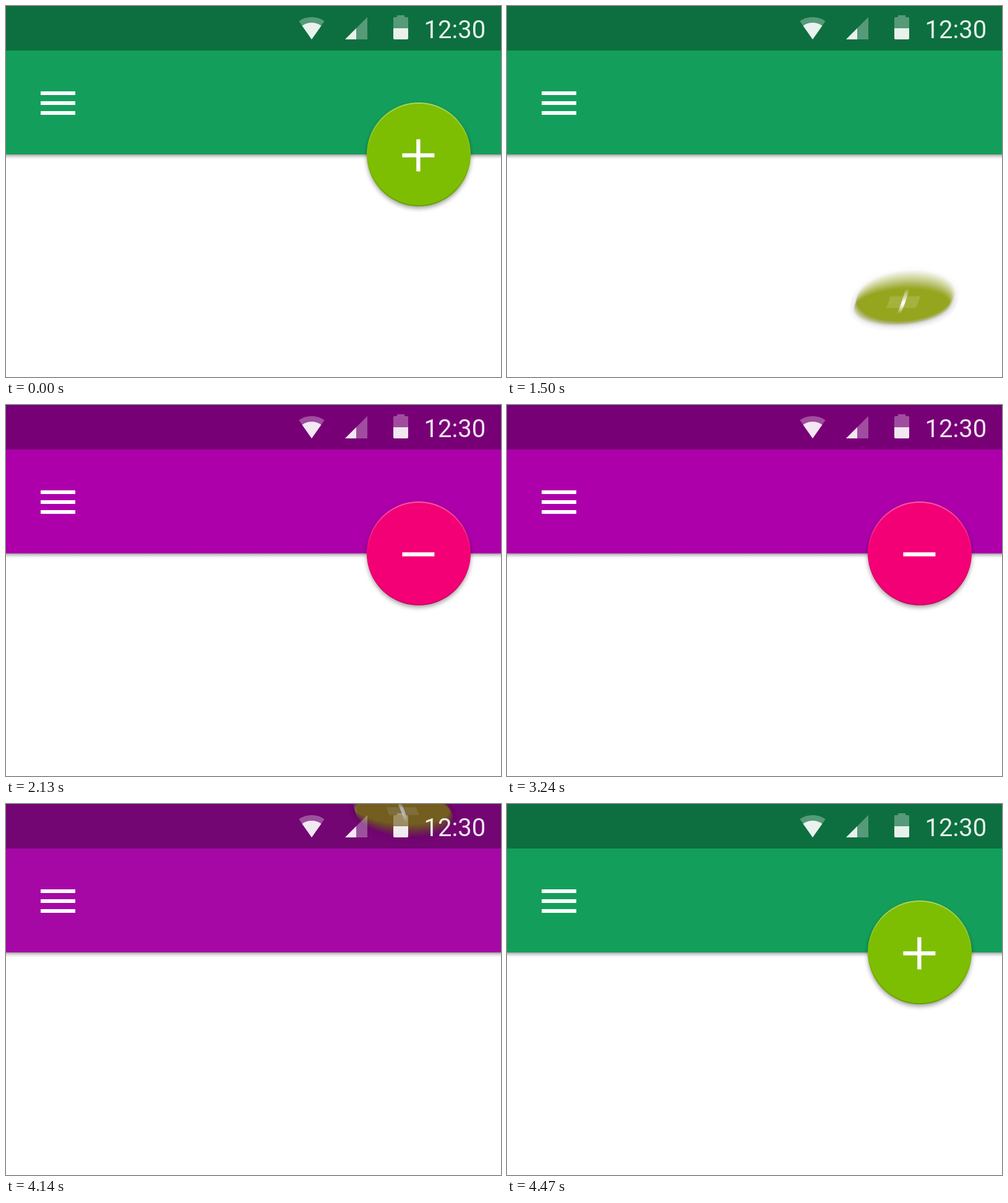
Write an HTML page with a canvas that moves like this. It is 800 px wide and 600 px high and loops after 4.53 s.

```html
<!DOCTYPE html>
<html lang="en">
<head>
<meta charset="utf-8">
<title>Flipping action button</title>
<style>
  html, body { margin: 0; width: 100%; height: 100%; overflow: hidden; background: #fff; }
  canvas, svg { position: absolute; left: 0; top: 0; width: 800px; height: 600px; }
  text { font: 40px Roboto, sans-serif; }
</style>
</head>
<body>
<canvas id="stage" width="800" height="600"></canvas>
<svg viewBox="0 0 800 600" fill="#fff">
  <rect width="800" height="72" fill="#000" opacity=".305"/>
  <g opacity=".3">
    <path d="M494 54L473.4 24.5A36 36 0 0 1 514.6 24.5Z"/>
    <path d="M548 54L584 18V54Z"/>
    <path d="M632 15h12v3h4a2 2 0 0 1 2 2v32a2 2 0 0 1-2 2h-20a2 2 0 0 1-2-2v-32a2 2 0 0 1 2-2h4Z"/>
  </g>
  <g opacity=".87">
    <path d="M494 54L478.5 31.9A27 27 0 0 1 509.5 31.9Z"/>
    <path d="M548 54L566 36V54Z"/>
    <path d="M626 36h24v16a2 2 0 0 1-2 2h-20a2 2 0 0 1-2-2Z"/>
  </g>
  <text x="675.5" y="52" opacity=".9">12:30</text>
  <path d="M56 138h56v6h-56ZM56 154h56v6h-56ZM56 170h56v6h-56Z"/>
</svg>
<script>
const LOOP = 4530, STEP = 30, FLIP = 870, STARTS = [1260, 3600];
const SHUTTER = 14, SAMPLES = 15;
const BAR = [[19, 159, 91], [173, 0, 170]];
const FACE = [[125, 190, 2], [244, 0, 118]];
const ORBIT = 302, DEPTH = 1700, EYE = [322, 300], HOME = [667, 240], RADIUS = 84;

const stage = document.getElementById('stage').getContext('2d');
const layer = () => {
  const c = document.createElement('canvas');
  c.width = 800;
  c.height = 600;
  return c.getContext('2d');
};
const single = layer(), blurred = layer();

const clamp = x => Math.min(1, Math.max(0, x));
const smooth = x => (x = clamp(x), x * x * (3 - 2 * x));
const mix = (pair, k) => pair[0].map((a, i) => a + (pair[1][i] - a) * k);
const rgb = c => `rgb(${c.map(Math.round)})`;

// cubic-bezier(.512, 0, .304, 1)
function ease(x) {
  if (x <= 0 || x >= 1) return clamp(x);
  let lo = 0, hi = 1;
  for (let i = 0; i < 24; i++) {
    const u = (lo + hi) / 2, v = 1 - u;
    if (3 * v * v * u * .512 + 3 * v * u * u * .304 + u * u * u < x) lo = u; else hi = u;
  }
  return smooth(lo);
}

// The button orbits a horizontal axis behind the screen, always facing outwards.
function project(angle, u, v) {
  const sin = Math.sin(angle), cos = Math.cos(angle);
  const s = DEPTH / (DEPTH + ORBIT * (1 - cos) + v * sin);
  return [
    EYE[0] + (HOME[0] + u - EYE[0]) * s,
    EYE[1] + (HOME[1] + ORBIT * sin + v * cos - EYE[1]) * s
  ];
}

function fillShape(ctx, angle, points, style) {
  ctx.beginPath();
  for (const [u, v] of points) ctx.lineTo(...project(angle, u, v));
  ctx.closePath();
  ctx.fillStyle = style;
  ctx.fill();
}

const disc = r => Array.from({ length: 120 }, (_, i) =>
  [r * Math.cos(i * Math.PI / 60), r * Math.sin(i * Math.PI / 60)]);
const box = (w, h) => [[-w, -h], [w, -h], [w, h], [-w, h]].map(([x, y]) => [x - .6, y + 1.5]);
const OUTER = disc(RADIUS), INNER = disc(RADIUS - 2);
const ACROSS = box(26, 3.2), UPRIGHT = box(3.2, 26);

function drawButton(ctx, time, second) {
  const turn = ease(time / FLIP), angle = turn * 2 * Math.PI;
  const pink = smooth(time / FLIP);
  const face = mix(FACE, second ? 1 - pink : pink);
  const rim = ctx.createLinearGradient(...project(angle, 0, -RADIUS), ...project(angle, 0, RADIUS));
  rim.addColorStop(0, rgb(face.map(c => c + (255 - c) * .35)));
  rim.addColorStop(.5, rgb(face));
  rim.addColorStop(1, rgb(face.map(c => c * .84)));

  ctx.save();
  ctx.shadowColor = 'rgba(0,0,0,.36)';
  ctx.shadowBlur = 7;
  ctx.shadowOffsetY = 3.5 * Math.cos(angle);
  fillShape(ctx, angle, OUTER, rim);
  ctx.restore();

  fillShape(ctx, angle, INNER, rgb(face));
  fillShape(ctx, angle, ACROSS, '#fff');
  if ((turn < .5) !== second) fillShape(ctx, angle, UPRIGHT, '#fff');
}

function drawBlurred(time, second) {
  blurred.clearRect(0, 0, 800, 600);
  blurred.globalCompositeOperation = 'lighter';
  blurred.globalAlpha = 1 / SAMPLES;
  for (let i = 0; i < SAMPLES; i++) {
    single.clearRect(0, 0, 800, 600);
    drawButton(single, time + SHUTTER * ((i + .5) / SAMPLES - .5), second);
    blurred.drawImage(single.canvas, 0, 0);
  }
  stage.drawImage(blurred.canvas, 0, 0);
}

const barShadow = stage.createLinearGradient(0, 240, 0, 249);
[.36, .22, .1, .03, 0].forEach((a, i) => barShadow.addColorStop(i / 4, `rgba(0,0,0,${a})`));

function render(t) {
  const second = t >= 2400;
  const time = t - STARTS[+second];
  const bar = smooth((time - 490) / 380);

  stage.fillStyle = '#fff';
  stage.fillRect(0, 0, 800, 600);
  stage.fillStyle = rgb(mix(BAR, second ? 1 - bar : bar));
  stage.fillRect(0, 0, 800, 240);
  stage.fillStyle = barShadow;
  stage.fillRect(0, 240, 800, 9);

  if (time > 0 && time < FLIP) drawBlurred(time, second);
  else drawButton(stage, time, second);
}

let start, last;
function tick(now) {
  start ??= now;
  const t = Math.floor((now - start) % LOOP / STEP) * STEP;
  if (t !== last) render(last = t);
  requestAnimationFrame(tick);
}
render(0);
requestAnimationFrame(tick);
</script>
</body>
</html>
```
